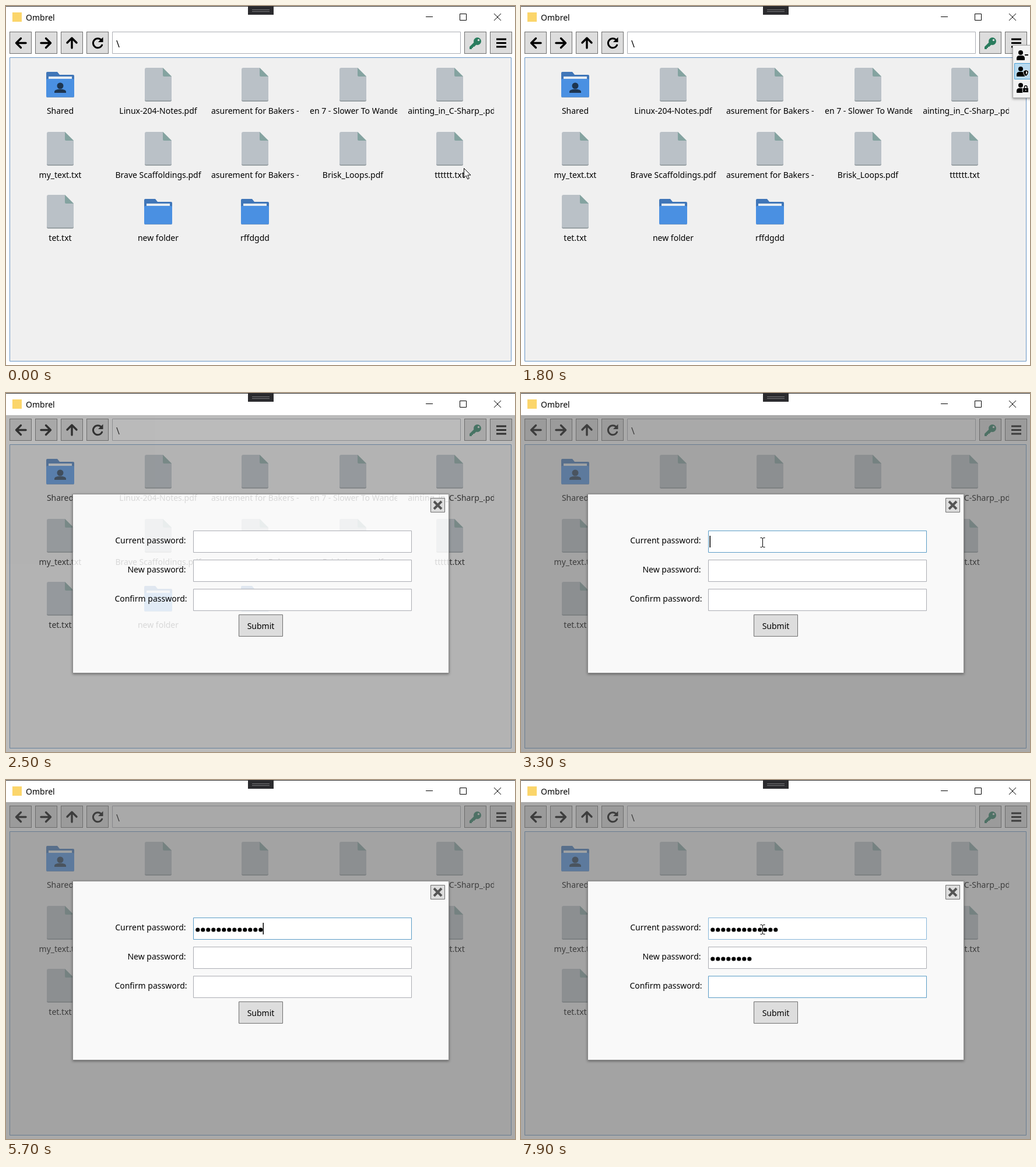
Write an HTML page that moves like this. It is 873 by 616 pixels and loops after 8000 ms.

```html
<!DOCTYPE html>
<html lang="en">
<head>
<meta charset="utf-8">
<title>Ombrel</title>
<style>
html, body { margin: 0; width: 100%; height: 100%; overflow: hidden; background: #fff; }
svg { display: block; }
text { font: 500 14px "Noto Sans", "Open Sans", sans-serif; fill: #000; }
.mid { text-anchor: middle; }
.end { text-anchor: end; }
.title { font-weight: 400; }
.btn { fill: #ddd; stroke: #707070; }
.line { fill: none; stroke: #000; stroke-width: 3.4; stroke-linecap: round; stroke-linejoin: round; }
.thin { fill: none; stroke: #000; }
.field { fill: #fff; stroke: #abadb3; }
.dots { fill: none; stroke: #000; stroke-width: 7.2; stroke-linecap: round; stroke-dasharray: 0 9; }

/* Every part shares one 8 s clock; 1.25% = 100 ms. */
.anim { animation: 8s step-end infinite; }
.move { animation: move 8s linear infinite; }
#arrow { animation-name: arrow; }
#beam { animation-name: beam; }
#menu { animation-name: menu; }
#hover { animation-name: hover; }
#dim { animation-name: dim; }
#sheet { animation-name: sheet; }
#ghost { animation-name: ghost; }
#form { animation-name: form; }
#field1 { animation-name: field1; }
#field2 { animation-name: field2; }
#field3 { animation-name: field3; }
#caret1 { animation-name: caret1; }
#caret2 { animation-name: caret2; }
#caret3 { animation-name: caret3; }
#type1 { animation: type1 8s infinite; }
#type2 { animation: type2 8s infinite; }

@keyframes move {
  0%, 1.25% { transform: translate(785px, 278px); }
  6% { transform: translate(822px, 150px); }
  11%, 13% { transform: translate(843px, 67px); }
  15.6% { transform: translate(858px, 84px); }
  18.75% { transform: translate(886px, 112px); }
  32% { transform: translate(886px, 125px); }
  37.5% { transform: translate(700px, 205px); }
  40%, 100% { transform: translate(414px, 256px); }
}
@keyframes arrow { 0% { opacity: 1; } 39%, 100% { opacity: 0; } }
@keyframes beam {
  0% { opacity: 0; } 39% { opacity: 1; } 43.75% { opacity: 0; }
  73.75% { opacity: 1; } 77.5% { opacity: 0; } 92.5%, 100% { opacity: 1; }
}
@keyframes menu {
  0% { opacity: 0; } 12.5% { opacity: .7; } 15% { opacity: 1; }
  30% { opacity: .6; } 31.25%, 100% { opacity: 0; }
}
@keyframes hover {
  0% { opacity: 0; transform: translateY(-28px); }
  15% { opacity: 1; transform: translateY(-28px); }
  17.5% { opacity: 1; transform: none; }
  28.75%, 100% { opacity: 0; transform: none; }
}
@keyframes dim {
  0% { opacity: 0; } 28.75% { opacity: .05; } 30% { opacity: .17; }
  31.25% { opacity: .46; } 32.5%, 100% { opacity: .58; }
}
@keyframes sheet {
  0% { opacity: 0; } 28.75% { opacity: .3; } 30% { opacity: .92; } 31.25%, 100% { opacity: 1; }
}
@keyframes ghost {
  0% { opacity: 0; } 28.75% { opacity: .9; } 30% { opacity: .6; }
  31.25% { opacity: .13; } 32.5%, 100% { opacity: 0; }
}
@keyframes form {
  0% { opacity: 0; } 28.75% { opacity: .12; } 30% { opacity: .42; } 31.25%, 100% { opacity: 1; }
}
@keyframes field1 {
  0% { stroke: #abadb3; } 39% { stroke: #86b6da; } 41.25% { stroke: #5a9cc6; }
  73.75%, 100% { stroke: #86b6da; }
}
@keyframes field2 { 0% { stroke: #abadb3; } 73.75% { stroke: #5a9cc6; } 92.5%, 100% { stroke: #abadb3; } }
@keyframes field3 { 0% { stroke: #abadb3; } 92.5%, 100% { stroke: #5a9cc6; } }
@keyframes caret1 { 0% { opacity: 0; } 41.25% { opacity: 1; } 73.75%, 100% { opacity: 0; } }
@keyframes caret2 { 0% { opacity: 0; } 73.75% { opacity: 1; } 92.5%, 100% { opacity: 0; } }
@keyframes caret3 { 0% { opacity: 0; } 92.5% { opacity: 1; } 98%, 100% { opacity: 0; } }
@keyframes type1 {
  0% { transform: none; }
  43.75% { transform: translateX(0); animation-timing-function: steps(13); }
  68.1%, 100% { transform: translateX(117px); }
}
@keyframes type2 {
  0% { transform: none; }
  76.25% { transform: translateX(0); animation-timing-function: steps(8); }
  87.5%, 100% { transform: translateX(72px); }
}
</style>
</head>
<body>
<svg width="873" height="616" viewBox="0 0 873 616">
  <defs>
    <g id="file">
      <path d="M-20 0H8L23 15V55q0 3-3 3H-20q-3 0-3-3V3q0-3 3-3z" fill="#bac1c7"/>
      <path d="M-23 54v1q0 3 3 3H20q3 0 3-3v-1q0 2-3 2H-20q-3 0-3-2z" fill="#98a0a4"/>
      <path d="M8 0L23 15H10q-2 0-2-2z" fill="#84a3a0"/>
    </g>
    <g id="folder">
      <path d="M-22 7h17l4 5h23q2 0 2 2v20h-48V9q0-2 2-2z" fill="#4076b8"/>
      <path d="M-20 15h40v8h-40z" fill="#e6ecf2"/>
      <path d="M-24 21q0-2 2-2h44q2 0 2 2v28q0 2-2 2h-44q-2 0-2-2z" fill="#4a90e2"/>
      <path d="M-20 15h40v4h-40z" fill="#e6ecf2"/>
      <path d="M-23 50.5h46" stroke="#6f97c4"/>
    </g>
    <g id="person">
      <circle cx="7" cy="4" r="4"/>
      <path d="M0 16v-2q0-5 5-5h4q5 0 5 5v2q0 1-1 1H1q-1 0-1-1z"/>
    </g>
    <clipPath id="sheetClip"><path d="M115 174h644v306H115z"/></clipPath>
    <filter id="shadow" x="-10%" y="-10%" width="120%" height="120%">
      <feDropShadow dx="0" dy="1.5" stdDeviation="2" flood-opacity=".4"/>
    </filter>
  </defs>

  <path d="M0 0h873v616H0z" fill="#fff"/>
  <path d="M0 0h873v1H0z" fill="#2c2c2c"/>
  <path d="M415 0h44v15h-44z" fill="#2b2b2e"/>
  <path d="M422 6.5h30M422 9.5h30" stroke="#77777a"/>
  <path d="M11 11h16v16H11z" fill="#fbd56b"/>
  <text class="title" x="34" y="25">Ombrel</text>
  <path class="thin" d="M720 18.5h12M778.5 13.5h11v11h-11zM837 13l12 12m0-12l-12 12"/>

  <g id="toolbar"></g>
  <path d="M182.5 44.5h597v37h-597z" class="field"/>
  <text class="title" x="189" y="71" style="font-size:16px">\</text>
  <g class="line">
    <path d="M18 63.5h16M25.5 55.5l-8 8 8 8"/>
    <path d="M60 63.5h16M68.5 55.5l8 8-8 8"/>
    <path d="M113 56v16M105 63l8-8 8 8"/>
    <path d="M163.5 58.5a8 8 0 1 0 1.2 8.5" stroke-width="3"/>
    <path d="M841 57h17M841 63.5h17M841 70h17" stroke-width="3" stroke-linecap="butt"/>
  </g>
  <path d="M166.500 53.500v8.500h-8.500z"/>
  <g fill="#2a7c5e">
    <circle cx="808.500" cy="60.500" r="6.500"/>
    <path d="M803 62l4 4-4 4h-2v2h-2v2h-4v-4z"/>
    <circle cx="810.500" cy="58.500" r="1.700" fill="#ddd"/>
  </g>

  <path d="M6.500 88.500h860v521h-860z" fill="#f0f0f0" stroke="#6694c4"/>
  <g id="items"></g>

  <path id="dim" class="anim" d="M0 38h873v578H0z" fill="#6b6b6b"/>

  <g id="menu" class="anim">
    <path d="M843.500 67.500h60v90h-60z" fill="#f2f2f2" stroke="#a8a8a8" filter="url(#shadow)"/>
    <path id="hover" class="anim" d="M846.500 98.500h60v27h-60z" fill="#b9daf0" stroke="#4aa0d6"/>
    <use href="#person" x="850" y="76"/>
    <use href="#person" x="850" y="104"/>
    <use href="#person" x="850" y="132"/>
    <path d="M864 84h6" stroke="#000" stroke-width="2"/>
    <path d="M866 109.500l4.500 2q0 7-4.500 9-4.500-2-4.500-9z" stroke="#f2f2f2"/>
    <path d="M866 112v6q2-1.500 2.500-5z" fill="#f2f2f2"/>
    <path d="M860.500 140.500h10v8h-10z" stroke="#f2f2f2"/>
    <path d="M863.500 141v-2a2.200 2.200 0 0 1 4.400 0v2" class="thin" stroke-width="1.500"/>
    <circle cx="865.700" cy="144.500" r="1" fill="#f2f2f2"/>
  </g>

  <path id="sheet" class="anim" d="M114.500 173.500h645v307h-645z" fill="#f9f9f9" stroke="#8c8c8c" filter="url(#shadow)"/>
  <g clip-path="url(#sheetClip)"><use id="ghost" class="anim" href="#items"/></g>

  <g id="form" class="anim">
    <path class="btn" d="M728.500 180.500h24v24h-24z"/>
    <path d="M734 186l13 13m0-13l-13 13" stroke="#555" stroke-width="4"/>
    <text class="end" x="308.500" y="258">Current password:</text>
    <text class="end" x="308.500" y="308">New password:</text>
    <text class="end" x="310.500" y="358">Confirm password:</text>
    <path id="field1" class="field anim" d="M321.500 236.500h374v37h-374z"/>
    <path id="field2" class="field anim" d="M321.500 286.500h374v37h-374z"/>
    <path id="field3" class="field anim" d="M321.500 336.500h374v37h-374z"/>
    <svg x="322" y="237" width="373" height="36">
      <path class="dots" d="M6.800 20h108.500"/>
      <g id="type1">
        <path d="M2 0h380v36H2z" fill="#fff"/>
        <path id="caret1" class="anim" d="M1.500 8h1.500v20h-1.500z"/>
      </g>
    </svg>
    <svg x="322" y="287" width="373" height="36">
      <path class="dots" d="M6.800 20h63.500"/>
      <g id="type2">
        <path d="M2 0h380v36H2z" fill="#fff"/>
        <path id="caret2" class="anim" d="M1.500 8h1.500v20h-1.500z"/>
      </g>
    </svg>
    <path id="caret3" class="anim" d="M323.500 345h1.500v20h-1.500z"/>
    <path class="btn" d="M399.500 380.500h75v37h-75z"/>
    <text class="mid" x="437" y="405">Submit</text>
  </g>

  <g class="move">
    <path id="arrow" class="anim" d="M.5.500v16l3.700-3.500 2.500 6 2.600-1.100-2.500-5.800h5.200z" fill="#fff" stroke="#000"/>
    <path id="beam" class="anim thin" d="M-3.500-7.500h2.500l1.500 1 1.500-1h2.500M.5-7v15M-3.500 8.500h2.500l1.500-1 1.500 1h2.500"/>
  </g>
</svg>
<script>
const columns = [93, 261, 427, 595, 761];
const rows = [106, 216, 324];
const cellWidth = 150;
// Label, icon, and for clipped labels the anchor with its offset from the column centre.
const items = [
  ["Shared", "folder"],
  ["Linux-204-Notes.pdf", "file"],
  ["asurement for Bakers - 2", "file", "start", -75],
  ["en 7 - Slower To Wander", "file", "start", -74],
  ["ainting_in_C-Sharp_.pd", "file", "end", 78],
  ["my_text.txt", "file"],
  ["Brave Scaffoldings.pdf", "file"],
  ["asurement for Bakers - 2", "file", "start", -75],
  ["Brisk_Loops.pdf", "file"],
  ["tttttt.txt", "file"],
  ["tet.txt", "file"],
  ["new folder", "folder"],
  ["rffdgdd", "folder"]
];

const cell = ([label, icon, anchor = "middle", shift = 0], i) => {
  const x = columns[i % 5], y = rows[Math.floor(i / 5)];
  const left = x - cellWidth / 2;
  return `<use href="#${icon}" x="${x}" y="${y}"/>
    <svg x="${left}" y="${y + 60}" width="${cellWidth + 1}" height="26">
      <text x="${cellWidth / 2 + shift}" y="19" text-anchor="${anchor}">${label}</text>
    </svg>`;
};
const badge = `<g fill="#1d3550"><circle cx="93" cy="137" r="5.500"/>
  <path d="M83 149v-2q0-3 6-4h8q6 1 6 4v2z"/></g>`;
document.getElementById("items").innerHTML = items.map(cell).join("") + badge;

document.getElementById("toolbar").innerHTML = [6, 50, 94, 138, 786, 830]
  .map(x => `<rect class="btn" x="${x + .5}" y="44.5" width="37" height="37"/>`).join("");
</script>
</body>
</html>
```
